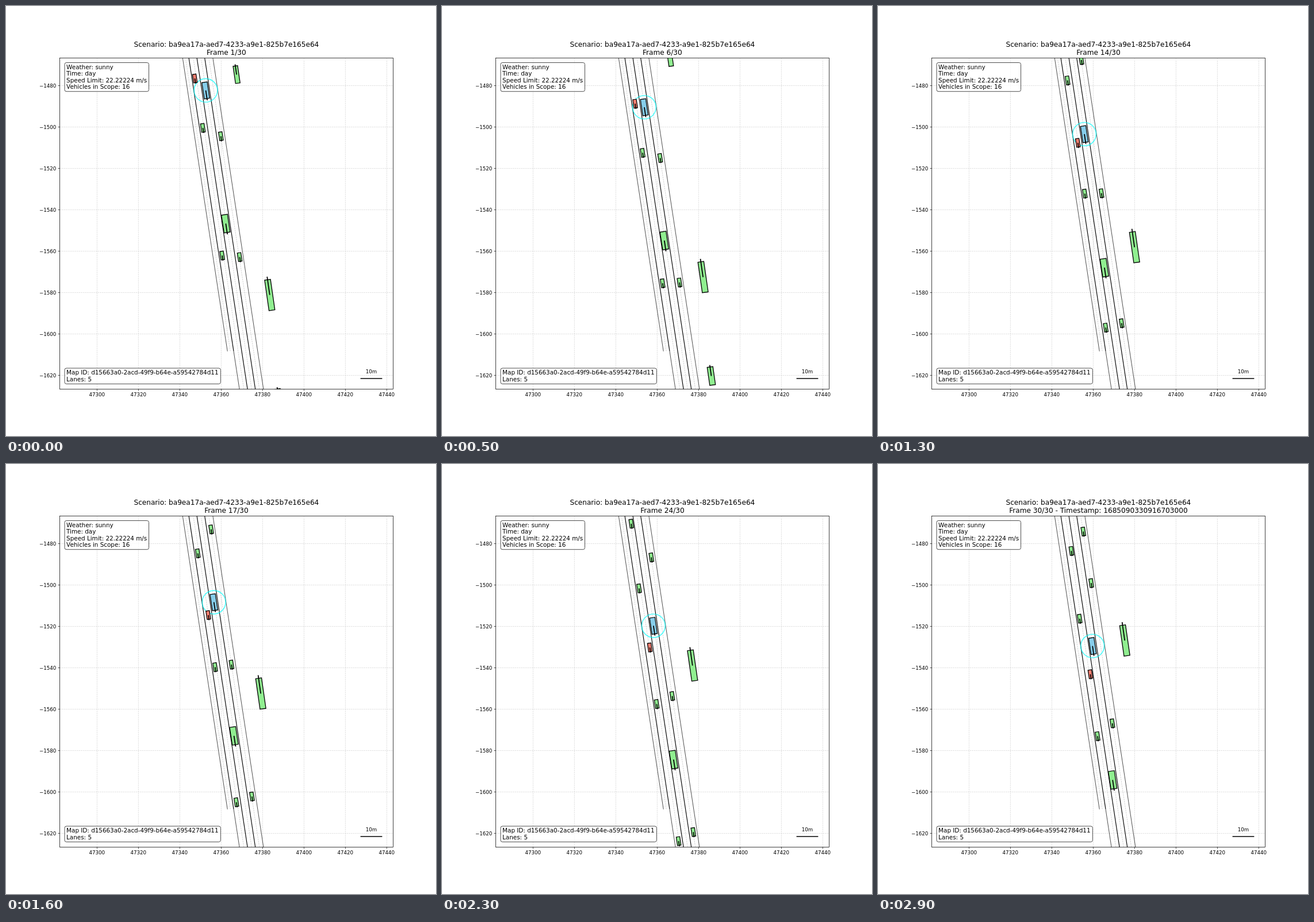
An HTML page for the animation above (3000 ms loop, 748 by 748 pixels).

```html
<!DOCTYPE html>
<html lang="en">
<head>
<meta charset="utf-8">
<title>Traffic scenario</title>
<style>
  html, body { margin: 0; width: 100%; height: 100%; overflow: hidden; background: #fff; }
  svg { display: block; width: 100%; height: 100%; }
  text { font-family: "DejaVu Sans", sans-serif; fill: #000; white-space: pre; }
</style>
</head>
<body>
<svg id="stage" viewBox="0 0 748 748">
  <defs><clipPath id="plot"><rect x="93.5" y="90.5" width="580" height="576"/></clipPath></defs>
</svg>
<script>
const stage = document.getElementById("stage");
const BOX = { l: 93.5, t: 90.5, r: 673.5, b: 666.5 };
const STEP = 100, COUNT = 30;

function add(parent, tag, attrs, text) {
  const node = document.createElementNS("http://www.w3.org/2000/svg", tag);
  for (const key in attrs) node.setAttribute(key, attrs[key]);
  if (text !== undefined) node.textContent = text;
  parent.appendChild(node);
  return node;
}
const line = (parent, x1, y1, x2, y2, stroke, width, more) =>
  add(parent, "line", { x1, y1, x2, y2, stroke, "stroke-width": width, ...more });
const label = (x, y, size, anchor, text) =>
  add(stage, "text", { x, y, "font-size": size, "text-anchor": anchor }, text);

const plot = add(stage, "g", { "clip-path": "url(#plot)" });

// Grid, ticks and tick labels
const dash = { "stroke-dasharray": "2.56 1.11" };
for (let i = 0; i < 8; i++) {
  const x = 158.4 + 72 * i, y = 138.5 + 72 * i;
  line(plot, x, BOX.b, x, BOX.t, "#d3d3d3", 0.69, dash);
  line(stage, x, BOX.b, x, BOX.b + 3, "#000", 0.69);
  label(x - 0.2, 679, 8.66, "middle", 47300 + 20 * i);
  line(plot, BOX.l, y, BOX.r, y, "#d3d3d3", 0.69, dash);
  line(stage, BOX.l - 3, y, BOX.l, y, "#000", 0.69);
  label(87.4, y + 3.4, 8.66, "end", "\u2212" + (1480 + 20 * i));
}

// Lanes: x at the top edge, extended along a common slope
const SLOPE = 0.1528, END = 600.7, TOP = 85, BOTTOM = 670;
function lane(x, from, to, stroke, width, more) {
  const at = y => x + (y - 90) * SLOPE;
  line(plot, at(from), from, at(to), to, stroke, width, more);
}
const inner = (x, to) => lane(x, TOP, to, "#000", 1.15);
const edge = (x, from, to) => lane(x, from, to, "#444", 0.95);
for (let i = 0; i < 4; i++)
  lane(312.2 + 13.5 * i, TOP, i ? BOTTOM : END, "#bdbdbd", 0.7, { "stroke-dasharray": "2.6 1.3" });
edge(307.2, TOP, END);
inner(318, END);
edge(318, END, BOTTOM);
inner(332, BOTTOM);
inner(345.6, BOTTOM);
edge(359.8, TOP, BOTTOM);

const ring = add(plot, "circle", { r: 20.4, fill: "none", stroke: "#0ff", "stroke-width": 1.6, opacity: 0.7 });

// A vehicle starts at (x, y) and moves down by v per step, with gain a;
// drift is its sideways travel per pixel down.
function vehicle(x, y, v, a = 0, { w = 6.2, l = 14.9, fill = "#90ee90", drift = 0.151, life = COUNT } = {}) {
  const dir = Math.sign(v);
  const node = add(plot, "g", {});
  add(node, "rect", { x: -w / 2, y: -l / 2, width: w, height: l, fill, stroke: "#000", "stroke-width": 1.3 });
  line(node, 0, 0, 0, dir * l * 0.6, "#000", 1.73);
  const tilt = dir > 0 ? -8.6 : -8.2;
  return n => {
    const dy = v * n + a * n * n;
    const px = x + dy * drift, py = y + dy;
    node.setAttribute("transform", `translate(${px} ${py}) rotate(${tilt})`);
    node.setAttribute("display", n < life ? "inline" : "none");
    return [px, py];
  };
}

const traffic = [
  // same direction, left lane then right lane
  vehicle(328.5, 126, 8.9, -0.022, { fill: "#fa8072", drift: 0.171 }),
  vehicle(342.5, 212, 8.61, 0.014),
  vehicle(376.1, 434, 9.65, 0, { drift: 0.16 }),
  vehicle(313, 18.5, 8.45, 0.0065),
  vehicle(301.8, -77.9, 7.9),
  vehicle(373.8, 226.5, 7.54, 0.007),
  vehicle(406.5, 436.7, 8.85),
  vehicle(342.1, 16, 5.516, 0.037),
  vehicle(325.2, -94.2, 7.3),
  vehicle(382.3, 378.5, 5.9, 0, { w: 10.6, l: 31.2 }),
  // oncoming
  vehicle(458.8, 502.7, -6.11, -0.022, { w: 10.3, l: 53.6 }),
  vehicle(474.3, 682, -7.68, 0, { w: 10, l: 31.8, life: 8 }),
  vehicle(401.1, 119.3, -5.92, 0, { w: 8, l: 30.3 })
];
const ego = vehicle(347.5, 146.8, 5.855, 0, { w: 9.4, l: 28.6, fill: "#87ceeb" });

// Scale bar, frame, panels and captions
line(plot, 616.6, 648, 654.4, 648, "#000", 1.73);
label(635.4, 638.7, 8.66, "middle", "10m");
add(stage, "rect", { x: BOX.l, y: BOX.t, width: BOX.r - BOX.l, height: BOX.b - BOX.t,
  fill: "none", stroke: "#000", "stroke-width": 0.75 });

function panel(y, width, height, rows) {
  add(stage, "rect", { x: 102, y, width, height, rx: 3.1, fill: "#fff",
    stroke: "#000", "stroke-width": 0.87, opacity: 0.8 });
  rows.forEach((row, i) => label(105.1, y + 11.2 + 11.5 * i, 10.39, "start", row));
}
panel(98.5, 146.5, 50.2,
  ["Weather: sunny", "Time: day", "Speed Limit: 22.22224 m/s", "Vehicles in Scope: 16"]);
panel(630, 271.3, 27.4,
  ["Map ID: d15663a0-2acd-49f9-b64e-a59542784d11", "Lanes: 5"]);

label(383.4, 71, 12.12, "middle", "Scenario: ba9ea17a-aed7-4233-a9e1-825b7e165e64");
const counter = label(383.4, 85, 12.12, "middle", "");

let shown = -1;
function draw(ms) {
  const n = Math.floor(ms / STEP) % COUNT;
  if (n === shown) return;
  shown = n;
  counter.textContent = `Frame ${n + 1}/${COUNT}` +
    (n === COUNT - 1 ? " - Timestamp: 1685090330916703000" : "");
  traffic.forEach(move => move(n));
  const [x, y] = ego(n);
  ring.setAttribute("cx", x);
  ring.setAttribute("cy", y);
}

const start = performance.now();
function tick() {
  draw(performance.now() - start);
  requestAnimationFrame(tick);
}
tick();
</script>
</body>
</html>
```
